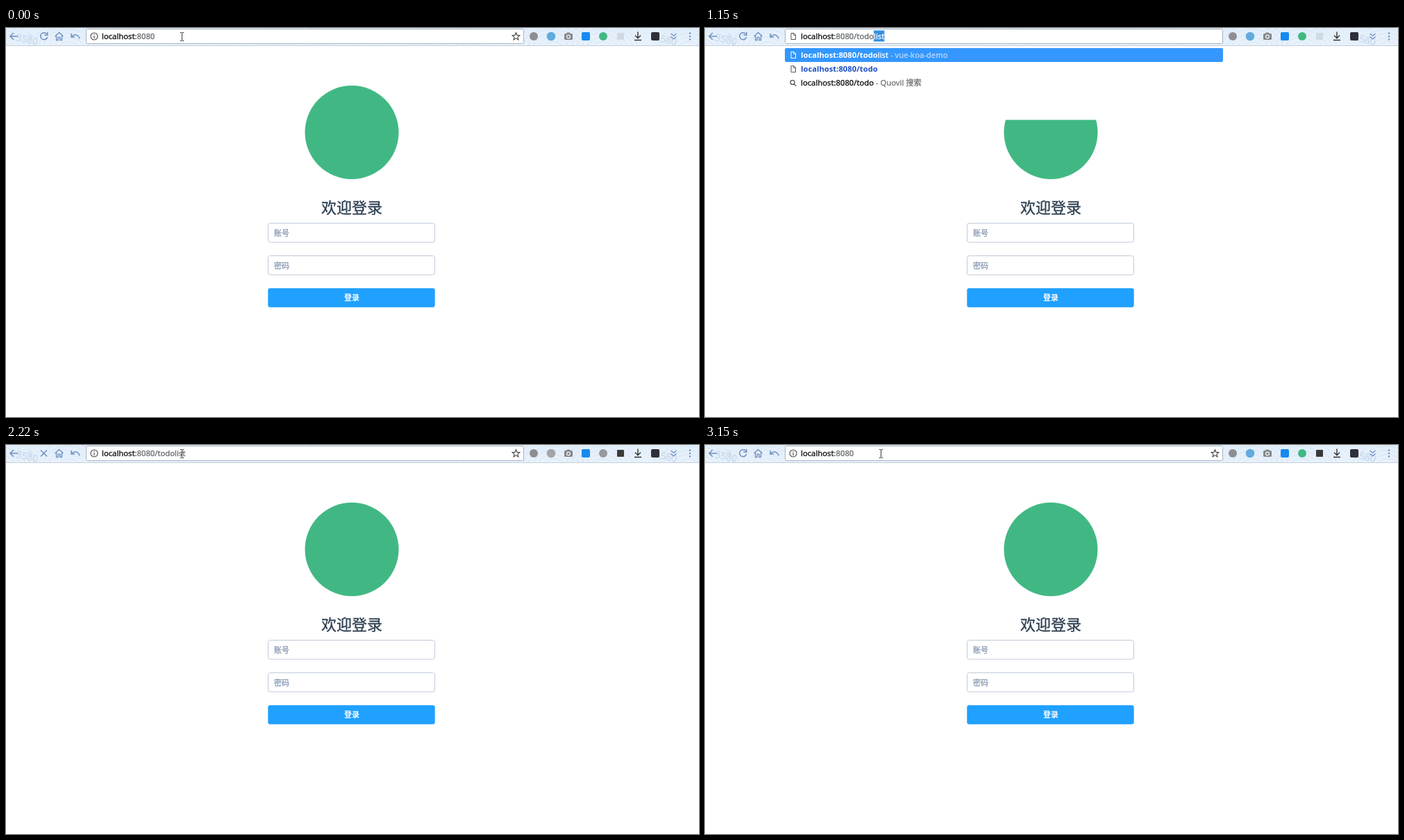
These frames come from a looping animation (998x561 px, 4.12 s). An HTML page with a canvas:

```html
<!DOCTYPE html>
<html lang="zh-CN">
<head>
<meta charset="utf-8">
<title>Login redirect</title>
<style>
  html, body { margin: 0; width: 100%; height: 100%; overflow: hidden; background: #fff; }
  canvas { display: block; }
</style>
</head>
<body>
<canvas id="stage" width="998" height="561"></canvas>
<script>
const ctx = document.getElementById('stage').getContext('2d');
const LOOP = 4120;
const HOST = 'localhost', PORT = ':8080';
const FONT = '"Noto Sans", "Noto Sans CJK SC", "Noto Sans CJK", sans-serif';
const BLUE = '#6f8fc0', INK = '#333', GREEN = '#41b883';

// Typing stages: start time, typed path, lower edge of the suggestions, edge line visible
const typing = [
  [310, '', 133, true],
  [740, 't', 153.5, true],
  [870, 'to', 153.5, false],
  [1020, 'tod', 153.5, false],
  [1100, 'todo', 143, false],
  [1150, 'todo', 132.5, false],
  [1200, 'todo', 112, false],
  [1290, 'todol', 93, false],
  [1430, 'todoli', 93, false],
  [1560, 'todolis', 93, false],
  [1710, 'todolist', 86, false],
  [1750, 'todolist', 79, false],
  [1790, 'todolist', 74.5, true]
];

function box(x, y, w, h, r, fill, stroke) {
  ctx.beginPath();
  ctx.roundRect(x, y, w, h, r);
  if (fill) { ctx.fillStyle = fill; ctx.fill(); }
  if (stroke) { ctx.strokeStyle = stroke; ctx.lineWidth = 1; ctx.stroke(); }
}

function disc(x, y, r, color) {
  ctx.beginPath();
  ctx.arc(x, y, r, 0, Math.PI * 2);
  ctx.fillStyle = color;
  ctx.fill();
}

function line(d, color, width = 1.3, dx = 0, dy = 0) {
  ctx.save();
  ctx.translate(dx, dy);
  ctx.strokeStyle = color;
  ctx.lineWidth = width;
  ctx.stroke(new Path2D(d));
  ctx.restore();
}

// A thin outline gives regular text the weight of hinted screen type
function text(str, x, y, color, size = 11.25, weight = 400, align = 'left') {
  ctx.font = `${weight} ${size}px ${FONT}`;
  ctx.textAlign = align;
  ctx.fillStyle = ctx.strokeStyle = color;
  ctx.fillText(str, x, y);
  if (weight < 700) {
    ctx.lineWidth = .3;
    ctx.strokeText(str, x, y);
  }
  return x + ctx.measureText(str).width;
}

function drawPage() {
  disc(498, 150.5, 67.5, GREEN);
  text('欢迎登录', 498, 267, '#2c3e50', 22, 400, 'center');
  [['账号', 281], ['密码', 328]].forEach(([label, y]) => {
    box(377.5, y + .5, 240, 27.5, 3, '#fff', '#bfcbd9');
    text(label, 386, y + 18.5, '#8b9db5', 11);
  });
  box(377.3, 375.3, 240.4, 27.4, 3, '#20a0ff');
  text('登录', 498, 393, '#fff', 11, 700, 'center');
}

function drawBackdrop() {
  const sky = ctx.createLinearGradient(0, 0, 0, 26);
  sky.addColorStop(0, '#e2eefb');
  sky.addColorStop(1, '#e9f2fb');
  ctx.fillStyle = sky;
  ctx.fillRect(0, 0, 998, 26);
  ctx.save();
  ctx.beginPath();
  ctx.rect(0, 0, 998, 25);
  ctx.clip();
  ctx.strokeStyle = '#d3e2f2';
  ctx.lineWidth = .8;
  for (const cx of [-8, 92, 420, 640, 790, 860, 985]) {
    for (let r = 8; r < 46; r += 6) {
      ctx.beginPath();
      ctx.ellipse(cx, 34, r * 1.2, r, .3, 0, Math.PI * 2);
      ctx.stroke();
    }
  }
  for (const x of [14, 934]) {
    ctx.save();
    ctx.translate(x, 16);
    ctx.rotate(.22);
    text('3580', 0, 2, '#c8d9ee', 14);
    ctx.restore();
  }
  ctx.restore();
  ctx.fillStyle = '#c5cfda';
  ctx.fillRect(0, 25, 998, 1);
}

function drawDocument(y, color) {
  line('M-3 -4.5H1L3.5 -2V4.5H-3ZM.8 -4.5V-1.8H3.5', color, 1, 127, y);
}

function drawSearch(y) {
  line('M2 -1A3 3 0 1 1 -4 -1A3 3 0 1 1 2 -1M1.2 1.2L4.5 4.5', '#555', 1.3, 127, y);
}

function drawToolbar({ loading, first, second, third }) {
  line('M17.5 12H6M11 7L6 12L11 17', BLUE, 1.5);
  line('M27 12H38M33 7L38 12L33 17', '#d0deee', 1.4);
  line(loading ? 'M50 7.5L59 16.5M59 7.5L50 16.5'
               : 'M58.6 8.5A5 5 0 1 0 59.6 13M59.8 6V10.2H55.5', BLUE, 1.5);
  line('M70.5 12L76.5 6.5L82.5 12M72.5 11V17.5H75V13.5H78V17.5H80.5V11', BLUE);
  line('M94 8V13H99M94.5 12.5C98 8.5 104 9 106 15.5', BLUE, 1.5);

  box(115.5, 1.5, 630, 21, 2, '#fff', '#a9b5c2');

  disc(760, 12, 6, '#8c8e91');
  disc(785, 12, 6.3, first);
  box(804, 8, 12, 9, 1.5, '#858789');
  box(807.5, 6.5, 5, 3, 1, '#858789');
  disc(810, 12.5, 3, '#eef4fa');
  disc(810, 12.5, 1.7, '#858789');
  box(829, 6, 12, 12, 2, '#168af0');
  disc(860, 12, 6, second);
  box(880, 7, 10, 10, 1, third);
  line('M910 5.5V14.5M906 10.8L910 14.8L914 10.8M905 17.5H915', '#333', 1.4);
  box(929, 6, 12, 12, 2, '#2d3038');
  line('M957.5 8L961.5 11.5L965.5 8M957.5 12.5L961.5 16L965.5 12.5', BLUE);
  [7.5, 12, 16.5].forEach(y => disc(985, y, 1.2, BLUE));
}

function drawAddress(path, rest = '', editing = false) {
  if (editing) {
    drawDocument(12, '#555');
  } else {
    line('M132 12A5 5 0 1 1 122 12A5 5 0 1 1 132 12M127 11V15M127 8.7V10', '#444', 1.1);
    line('M734.5 6.8L736 10.4L739.9 10.7L736.9 13.2L737.9 17L734.5 14.9L731.1 17L732.1 13.2L729.1 10.7L733 10.4Z', '#444', 1.1);
  }
  const hostEnd = text(HOST, 138, 15.7, '#111');
  const end = text(PORT + path, hostEnd, 15.7, '#686c70');
  if (rest) {
    ctx.fillStyle = '#3390e0';
    ctx.fillRect(end, 3.5, ctx.measureText(rest).width, 16);
    text(rest, end, 15.7, '#fff');
  } else if (editing) {
    ctx.fillStyle = '#222';
    ctx.fillRect(Math.round(end), 5, 1, 14);
  }
}

function suggestions(typed) {
  const query = HOST + PORT + '/' + typed;
  const match = (name, note) => ({ bold: query, plain: name.slice(typed.length), note });
  const exact = { bold: query };
  const search = { search: true, plain: query, note: 'Quovil 搜索' };
  const list = match('todolist', 'vue-koa-demo');
  const today = match('todaylist', '青禾驿站后台');
  const orders = match('todayorderlist');
  if (!typed) return [{ bold: query, note: 'vue-koa-demo' }, search, list, today, orders];
  if (typed.length < 4) return [list, exact, today, search, orders, match('todayOrderList')];
  return typed === 'todolist' ? [list, search] : [list, exact, search];
}

function drawSuggestions(typed, bottom, edge) {
  ctx.fillStyle = '#fff';
  ctx.fillRect(0, 26, 998, bottom - 26);
  if (edge) {
    ctx.fillStyle = '#e2e2e2';
    ctx.fillRect(0, Math.floor(bottom), 998, 1);
    ctx.fillStyle = '#f6f6f6';
    ctx.fillRect(0, Math.floor(bottom) + 1, 998, 2);
  }
  box(115, 29, 631, 20, 2, '#3497fd');
  suggestions(typed).forEach((row, i) => {
    const y = 39 + i * 20.2, base = Math.round(y + 4), active = i === 0;
    if (row.search) drawSearch(y); else drawDocument(y, active ? '#fff' : '#555');
    const color = active ? '#fff' : row.search ? '#111' : '#1c50c4';
    let x = 138;
    if (row.bold) x = text(row.bold, x, base, color, 11.25, 700);
    if (row.plain) x = text(row.plain, x, base, color);
    if (row.note) text(' - ' + row.note, x, base, active ? '#b5d9ff' : '#777');
  });
}

function render(t) {
  const between = (from, to) => t >= from && t < to;
  const stage = t < 2220 ? typing.findLast(([start]) => t >= start) : null;
  ctx.fillStyle = '#fff';
  ctx.fillRect(0, 0, 998, 561);
  if (!between(2360, 2770)) drawPage();
  drawBackdrop();
  drawToolbar({
    loading: between(2220, 2770),
    first: between(2220, 2360) ? '#a3a5a7' : '#62abdc',
    second: between(2220, 3150) ? '#97999b' : GREEN,
    third: t >= 2220 ? '#3a3a3a' : '#d0dae4'
  });
  if (stage) {
    const [, typed, bottom, edge] = stage;
    drawAddress('/' + typed, typed && 'todolist'.slice(typed.length), true);
    drawSuggestions(typed, bottom, edge);
  } else {
    drawAddress(between(2220, 2690) ? '/todolist' : '');
  }
  if (!between(310, 1790)) {
    line('M251 6.5H253M254 6.5H256M253.5 7V18M251 18.5H253M254 18.5H256', INK, 1);
  }
}

const begin = performance.now();
function tick() {
  render((performance.now() - begin) % LOOP);
  requestAnimationFrame(tick);
}
tick();
</script>
</body>
</html>
```
